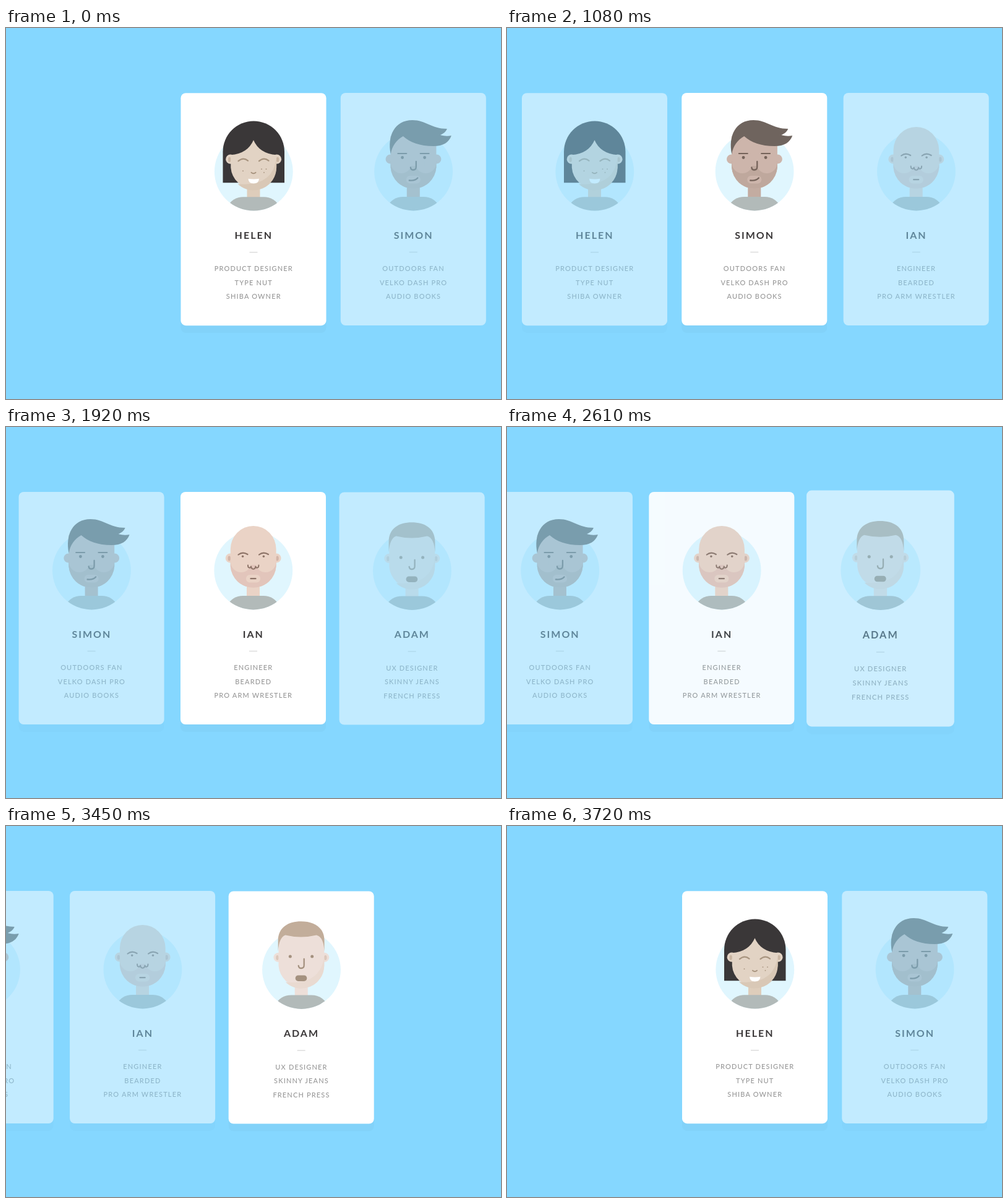
Write an HTML page that moves like this. It is 800x600 px and loops after 4410 ms.

```html
<!DOCTYPE html>
<html lang="en">
<head>
<meta charset="utf-8">
<title>Team cards</title>
<style>
  html, body { margin: 0; width: 100%; height: 100%; overflow: hidden; background: #85d7ff; }
  svg { display: block; width: 800px; height: 600px; }
  text { font-family: Lato, sans-serif; text-anchor: middle; }
  .name { font-size: 16px; font-weight: 700; letter-spacing: 2px; fill: #3a3738; }
  .detail { font-size: 11px; font-weight: 500; letter-spacing: 1.15px; fill: #989898; }
  .line { fill: none; stroke-linecap: round; }
</style>
</head>
<body>
<svg id="stage" viewBox="0 0 800 600">
  <clipPath id="disc"><circle cx="117.8" cy="127" r="63.4"/></clipPath>
</svg>
<script>
const shape = (d, fill) => `<path d="${d}" fill="${fill}"/>`;
const line = (d, color, width = 2.2) =>
  `<path class="line" d="${d}" stroke="${color}" stroke-width="${width}"/>`;
const dot = (x, y, r, fill) => `<circle cx="${x}" cy="${y}" r="${r}" fill="${fill}"/>`;
const pill = (x, y, w, h, r, fill) =>
  `<rect x="${x}" y="${y}" width="${w}" height="${h}" rx="${r}" fill="${fill}"/>`;
const pair = (draw, left, right) => draw(left) + draw(right);

const JAW = 'V120.5 A37 37 0 0 1 80.8 120.5 Z';

const ears = (skin, inner) => pair(x => dot(x, 107, 7.6, skin), 80.3, 155) + (inner
  ? pair(x => `<ellipse cx="${x}" cy="107.5" rx="2.3" ry="4" fill="${inner}"/>`, 78.8, 156.5) : '');
const neck = skin => pill(107, 148, 21, 24, 0, skin);
const cheekShade = fill =>
  shape('M154.6 106 V120.5 A37 37 0 0 1 92 147 Q148 152 154.6 106 Z', fill);
const beard = (skin, hair) =>
  shape('M80.8 110 H154.6 ' + JAW, hair) +
  pair(x => dot(x, 113, 17, skin), 98, 137.5) +
  pill(100, 100, 36, 18, 0, skin) +
  pill(106, 134, 23, 12.4, 6, skin);
const hookNose = (color, y) =>
  line(`M122 ${y} V119.5 q0 5 -4.5 5 q-4 0 -4.5 -4.2`, color, 2.3);

function woman() {
  const skin = '#e2d3c4', ink = '#a8947f';
  return shape('M68 145 V95 A49.75 49.75 0 0 1 167.5 95 V145 Z', '#3a3738') +
    ears(skin, '#c9b5a1') + neck('#decdbb') +
    shape('M80.8 100 Q108 98 117.5 76 Q127 98 154.6 100 ' + JAW, skin) +
    cheekShade('#d9c8b6') +
    pair(x => line(`M${x} 110 q8 -7 15.5 -.5`, ink), 93, 126.5) +
    line('M114 128.5 q3.5 3 7 0', ink, 2) +
    shape('M109 138.5 Q117.7 140 126.5 138.5 Q126 146.3 117.7 146.3 Q109.5 146.3 109 138.5 Z', '#fff') +
    [[100.5, 126], [130.5, 123], [138, 123], [134.5, 128.5]].map(([x, y]) => dot(x, y, .9, ink)).join('');
}

function quiffMan() {
  const skin = '#cdb5ab', ink = '#75635a';
  return ears(skin) + neck('#c3aca1') +
    shape('M80.8 70 H154.6 ' + JAW, skin) + beard(skin, '#bfa89d') +
    shape('M81 99 C75 70 87 44 116 44 C138 44 146 58 172 58 C170 63 166 66 161 68 C168 70 173 70 179 69 ' +
      'C175 80 166 86 150 86 C128 86 112 80 101 70 C90 76 83 86 81 99 Z', '#6f645e') +
    pair(x => line(`M${x} 98 h14`, ink, 2), 92.5, 128.8) +
    pair(x => dot(x, 104.5, 2.4, ink), 99.8, 135.8) +
    hookNose(ink, 111) +
    line('M111 141.5 Q120 142.5 124.5 137.5', ink, 2.4);
}

function baldMan() {
  const skin = '#ead3c6', ink = '#8d7367';
  return ears(skin, '#d3b5a8') + neck(skin) +
    shape('M80.8 92.5 A36.9 37.5 0 0 1 154.6 92.5 ' + JAW, skin) + beard(skin, '#e2c5bb') +
    pair(x => line(`M${x} 101.5 q7 -5.5 15 -.5`, ink), 93.5, 127) +
    pair(x => dot(x, 104.3, 1.7, ink), 100.6, 134.4) +
    line('M109 118.5 q0 4.2 2.8 4.2 q2.2 0 2.2 -3 q.3 5 3.7 5 q3.4 0 3.7 -5 q0 3 2.2 3 q2.8 0 2.8 -4.2', ink, 2) +
    line('M113.5 140.2 h8', ink, 2.3);
}

function shortHairMan() {
  const skin = '#eddfd9', ink = '#a4917f';
  return ears(skin, '#dcc8bc') + neck(skin) +
    shape('M80.8 75 Q117 60 154.6 75 ' + JAW, skin) + cheekShade('#e9dad1') +
    shape('M80 97 V80 C80 58 97 48.7 117 48.7 C138 48.7 154.8 58 154.8 80 V97 ' +
      'C154 82 150 73 142 71 Q117 77 92 71 C85 73 81 82 80 97 Z', '#c2ad9a') +
    pair(x => dot(x, 105.5, 2.5, ink), 99.6, 135) +
    hookNose(ink, 109.5) +
    pill(108, 136, 18.6, 9.4, 4.5, ink);
}

const people = [
  { name: 'HELEN', x: 0, y: 105.2, face: woman, details: ['PRODUCT DESIGNER', 'TYPE NUT', 'SHIBA OWNER'] },
  { name: 'SIMON', x: 258.3, y: 105, face: quiffMan, details: ['OUTDOORS FAN', 'VELKO DASH PRO', 'AUDIO BOOKS'] },
  { name: 'IAN', x: 519.7, y: 105, face: baldMan, details: ['ENGINEER', 'BEARDED', 'PRO ARM WRESTLER'] },
  { name: 'ADAM', x: 776.3, y: 105.5, face: shortHairMan, details: ['UX DESIGNER', 'SKINNY JEANS', 'FRENCH PRESS'] }
];

const label = (cls, y, text) => `<text class="${cls}" x="117.8" y="${y}">${text}</text>`;

const card = ({ name, face, details }) => `<g>
  <path class="shadow" opacity=".025"
    d="M0 368 V380 a8 8 0 0 0 8 8 H227 a8 8 0 0 0 8 -8 V368 a8 8 0 0 1 -8 8 H8 a8 8 0 0 1 -8 -8 Z"/>
  ${pill(0, 0, 235, 376, 8, '#fff')}
  ${dot(117.8, 127, 63.4, '#e0f6fe')}
  ${face()}
  <g clip-path="url(#disc)">${shape('M75 192 V184 Q84 168 101 168 H134 Q151 168 160 184 V192 Z', '#b2bab9')}</g>
  ${label('name', 235.8, name)}
  <path d="M111 257.5 h13" stroke="#dcdcdc" stroke-width="1.5"/>
  ${details.map((text, i) => label('detail', 288 + 22.5 * i, text)).join('')}
</g>`;

const stage = document.getElementById('stage');
stage.insertAdjacentHTML('beforeend', people.map(card).join(''));
const cards = [...stage.querySelectorAll(':scope > g')];

const LOOP = 4410, STEP = 30;
const stops = [282.5, 24, -237.7, -494, 283];
const moves = [[870, 205], [1710, 205], [2580, 188], [3420, 291]];

// cubic-bezier(.25, .1, .25, 1)
function ease(u) {
  if (u <= 0) return 0;
  if (u >= 1) return 1;
  let lo = 0, hi = 1, s;
  for (let i = 0; i < 24; i++) {
    s = (lo + hi) / 2;
    if (.75 * s * (1 - s) + s ** 3 < u) lo = s; else hi = s;
  }
  return .3 * s * (1 - s) ** 2 + 3 * s * s * (1 - s) + s ** 3;
}

function render(ms) {
  const t = Math.floor(ms % LOOP / STEP) * STEP;
  const k = Math.max(0, moves.findLastIndex(([start]) => start <= t));
  const [start, duration] = moves[k];
  const u = Math.min(1, Math.max(0, (t - start) / duration));
  const left = stops[k] + (stops[k + 1] - stops[k]) * ease(u);
  const rewinding = k === 3 && u > 0;

  cards.forEach((g, i) => {
    const incoming = i === k + 1 && u > 0;
    let focus = i === k ? 1 - u : incoming ? u : 0;
    if (rewinding) focus = i === 0 || i === 3 ? 1 : 0;
    const scale = incoming ? 1 + .068 * Math.sin(Math.PI * u) ** 2 : 1;
    const { x, y } = people[i];
    g.setAttribute('transform',
      `translate(${left + x + 117.5} ${y + 188}) scale(${scale}) translate(-117.5 -188)`);
    g.setAttribute('opacity', .5 + .5 * focus);
    // A card keeps its shadow once it has been picked.
    g.querySelector('.shadow').style.display = i <= k || incoming ? '' : 'none';
  });
}

function tick() {
  render(performance.now());
  requestAnimationFrame(tick);
}
tick();
</script>
</body>
</html>
```
